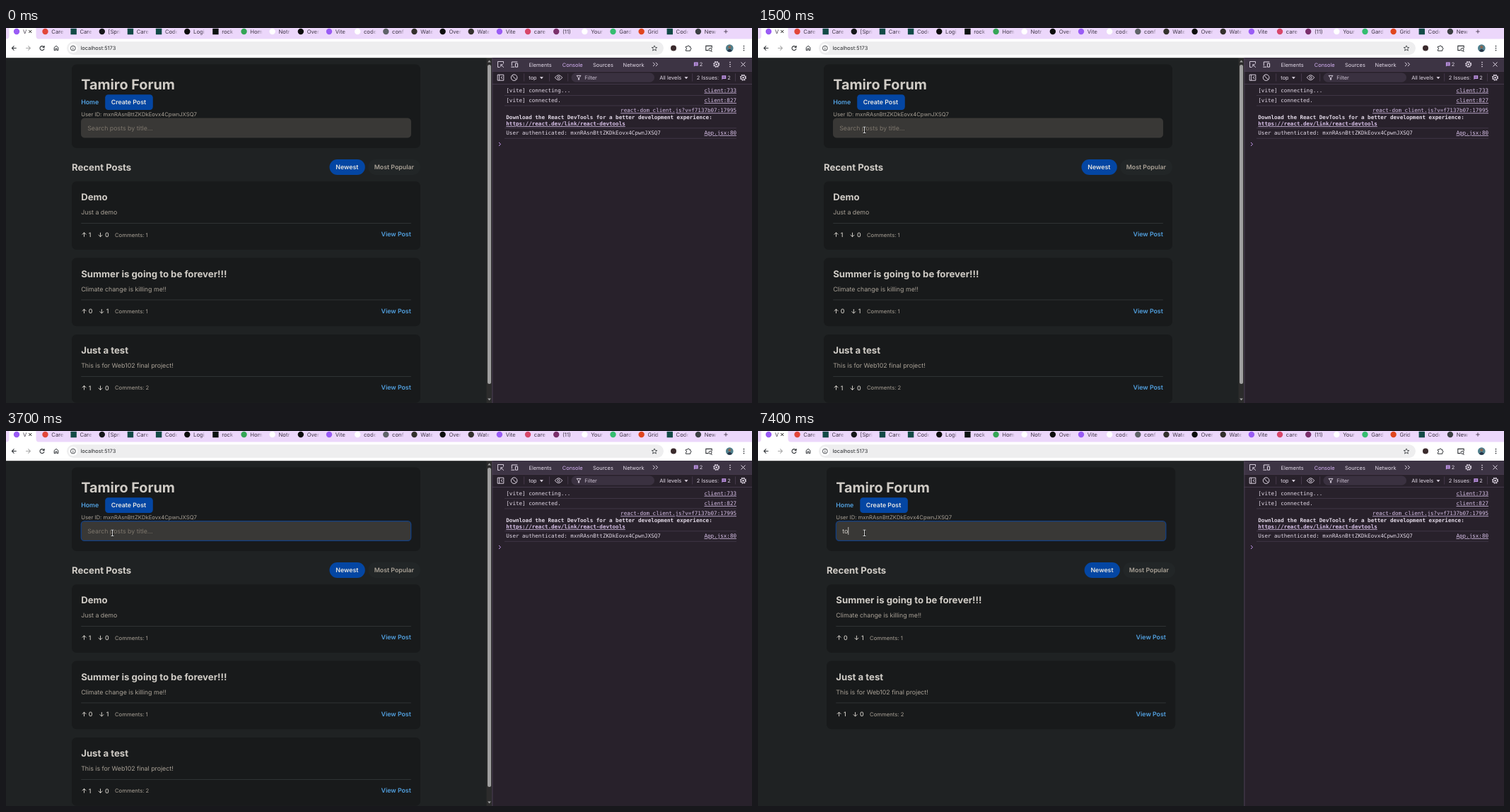
These frames come from a looping animation (1055 by 531 pixels, 8 s). An HTML page:

```html
<!DOCTYPE html>
<html lang="en">
<head>
<meta charset="utf-8">
<title>Forum search</title>
<style>
html, body { margin: 0; width: 100%; height: 100%; overflow: hidden; background: #1f2223; }
svg { display: block; width: 1055px; height: 531px; }
text { font-family: Inter, sans-serif; font-optical-sizing: none; text-rendering: geometricPrecision; white-space: pre; }
.mono { font-family: "DejaVu Sans Mono", monospace; }
</style>
</head>
<body>
<script>
const LOOP = 8000;
const NS = "http://www.w3.org/2000/svg";
const USER_ID = "mxnRAsnBttZKDkEovx4CpwnJXSQ7";
const INK = "#d0ccc6", MUTED = "#aaa297", LINK = "#52a1e0", BLUE = "#0446a3";
const CARD = "#181a1b", STRIP = "#ecd7fb", LILAC = "#d9c2ea", PALE = "#e3dae8";
const PANEL = "#28212b", PANEL_TOP = "#3d3444", PANEL_LINE = "#57495f";

function add(parent, tag, attrs = {}, content) {
  const node = document.createElementNS(NS, tag);
  for (const key in attrs) node.setAttribute(key, attrs[key]);
  if (content !== undefined) node.textContent = content;
  parent.append(node);
  return node;
}
const group = (parent) => add(parent, "g");
const rect = (parent, x, y, width, height, fill, rx = 0, more = {}) =>
  add(parent, "rect", { x, y, width, height, fill, rx, ...more });
const circle = (parent, cx, cy, r, fill, more = {}) =>
  add(parent, "circle", { cx, cy, r, fill, ...more });
const text = (parent, x, y, size, fill, content, weight = 400, more = {}) =>
  add(parent, "text", { x, y, "font-size": size, fill, "font-weight": weight, ...more }, content);
const icon = (parent, x, y, d, stroke, width = 1, fill = "none") =>
  add(parent, "path", { d, stroke, fill, "stroke-width": width, transform: `translate(${x} ${y})` });
const show = (node, on) => node.setAttribute("visibility", on ? "visible" : "hidden");
const shift = (node, x, y) => node.setAttribute("transform", `translate(${x} ${y})`);

const svg = add(document.body, "svg", { viewBox: "0 0 1055 531" });
const defs = add(svg, "defs");
const fade = add(defs, "linearGradient", { id: "fade" });
add(fade, "stop", { offset: 0, "stop-color": STRIP, "stop-opacity": 0 });
add(fade, "stop", { offset: .55, "stop-color": STRIP });

// Forum page
rect(svg, 0, 42, 688, 489, "#1f2223");
const page = group(svg);
rect(page, 93, 51.5, 493, 118.5, CARD, 6.6);
text(page, 106.2, 86.5, 19.8, INK, "Tamiro Forum", 700);
text(page, 106.2, 108.2, 8.8, LINK, "Home", 600);
rect(page, 140.2, 94.2, 67.6, 21.8, BLUE, 4.4);
text(page, 148.7, 108.2, 8.8, "#e8e6e3", "Create Post", 600);
text(page, 106.2, 124.8, 7.7, MUTED, "User ID: " + USER_ID);
rect(page, 106.5, 127.9, 466, 27.2, "#393836", 4.4, { stroke: "#43423f", "stroke-width": .6 });
const ring = rect(page, 106.3, 127.7, 466.4, 27.6, "none", 4.6, { stroke: "#123f82", "stroke-width": 1.3 });
const placeholder = text(page, 115.2, 144.8, 8.8, "#7d766c", "Search posts by title...");
const query = text(page, 115.2, 144.8, 8.8, INK, "");
const caret = rect(page, 0, 136, .8, 11, "#dedbd6");

text(page, 93, 201.6, 13.2, INK, "Recent Posts", 700);
rect(page, 457.5, 186, 50.3, 22, BLUE, 11);
text(page, 466.3, 200.2, 8.8, "#e8e6e3", "Newest", 600);
rect(page, 512.2, 186, 73.8, 22, "#222627", 11);
text(page, 520.7, 200.2, 8.8, MUTED, "Most Popular", 600);

const UP = "M0 3V-3M-2.8 -.2L0 -3L2.8 -.2";
const DOWN = "M0 -3V3M-2.8 .2L0 3L2.8 .2";

function post(parent, y, title, body, up, down, comments) {
  const g = group(parent);
  shift(g, 0, y);
  rect(g, 93, 0, 493, 96.7, CARD, 6.6);
  text(g, 106.2, 27.2, 13.2, INK, title, 700);
  text(g, 106.2, 47, 8.8, MUTED, body);
  rect(g, 106.2, 59, 466.6, .7, "#3a3e40");
  const downX = up ? 133.5 : 135.3;
  icon(g, 110.5, 75.5, UP, INK, 1);
  text(g, 116.8, 78.7, 8.8, INK, up, 500);
  icon(g, downX, 75.5, DOWN, INK, 1);
  text(g, downX + 6.5, 78.7, 8.8, INK, down, 500);
  text(g, 154, 78.4, 7.7, MUTED, "Comments: " + comments);
  text(g, 572.8, 78.3, 8.8, LINK, "View Post", 600, { "text-anchor": "end" });
}
const PITCH = 108.4;
const demo = group(page), matches = group(page);
post(demo, 217.2, "Demo", "Just a demo", 1, 0, 1);
post(matches, 217.2 + PITCH, "Summer is going to be forever!!!", "Climate change is killing me!!", 0, 1, 1);
post(matches, 217.2 + 2 * PITCH, "Just a test", "This is for Web102 final project!", 1, 0, 2);

const scrollbar = group(svg);
rect(scrollbar, 679.5, 42, 8, 489, "#2c2c2c");
rect(scrollbar, 681, 52, 5, 452, "#9f9f9f", 2.5);
icon(scrollbar, 683.5, 47, "M-2.4 1.5L0 -1.5L2.4 1.5Z", "none", 0, "#9f9f9f");
icon(scrollbar, 683.5, 526, "M-2.4 -1.5L0 1.5L2.4 -1.5Z", "none", 0, "#9f9f9f");

// Browser tabs
rect(svg, 0, 0, 1055, 16, STRIP);
const TEAL = "#124a46", BLACK = "#0c0c0c", ROCKET = "#0c1210";
const SQUARE = [TEAL, ROCKET];
const TABS = [
  ["Care", "#e2463a"], ["Care", TEAL], ["[Spri", "#16161a"], ["Care", TEAL], ["Code", TEAL],
  ["Logi", BLACK], ["rock", ROCKET], ["Hom", "#35a556"], ["Notr", "#fff"], ["Over", BLACK],
  ["Vite", "#9a5cf5"], ["code", "#fff"], ["conf", "#5f6368"], ["Wate", "#33302c"], ["Over", BLACK],
  ["Wate", "#33302c"], ["Vite", "#9a5cf5"], ["care", "#d8476a"], ["(11)", "#7a2f6b"], ["Your", "#fff"],
  ["Gard", "#35bd70"], ["Grid", "#e0451f"], ["Code", TEAL], ["New", "#3c4043"],
];
TABS.forEach(([label, color], i) => {
  const x = 55.5 + i * 40.15;
  rect(svg, x - 4.2, .8, 8.4, 8.4, color, SQUARE.includes(color) ? .5 : 4.2);
  text(svg, x + 8.8, 8, 7.7, "#3d3344", label);
  rect(svg, x + 20, 0, 12, 12, "url(#fade)");
});
add(svg, "path", { d: "M1 16Q4.5 15 4.5 11V0H42.5V11Q42.5 15 46 16Z", fill: "#fff" });
circle(svg, 15, 5, 4.2, "#9a5cf5");
text(svg, 24, 8, 7.7, "#3d3344", "V");
icon(svg, 34.3, 5, "M-2 -2L2 2M2 -2L-2 2", "#222", 1);
icon(svg, 1018, 5, "M-2.7 0H2.7M0 -2.7V2.7", "#4a3d52", .9);

// Address bar
rect(svg, 0, 15.5, 1055, 26.7, "#fff");
rect(svg, 86, 19.3, 844, 18.6, "#eeeeef", 9.3);
const DARK = "#33363a";
icon(svg, 11.5, 28.5, "M3.2 0H-3M0 -3.1L-3.1 0L0 3.1", DARK, 1.1);
icon(svg, 31.3, 28.5, "M-3.2 0H3M0 -3.1L3.1 0L0 3.1", "#aaa", 1.1);
icon(svg, 51, 28.5, "M2.5 -1.6A3 3 0 1 0 3 .5M3.1 -3.4V-1H.7", DARK, 1.1);
icon(svg, 71, 28.5, "M-2.8 3.2V-.8L0 -3.2L2.8 -.8V3.2H.9V.5H-.9V3.2Z", DARK, 1);
circle(svg, 94.8, 28.6, 6.5, "#fff");
circle(svg, 94.8, 28.6, 3.4, "none", { stroke: DARK, "stroke-width": .9 });
icon(svg, 94.8, 28.6, "M0 -.3V2M0 -1.9V-1", DARK, .9);
text(svg, 105.5, 31.2, 7.4, "#26282b", "localhost:5173");
icon(svg, 917, 28.6, "M0 -3.7L1.1 -1.2L3.8 -1L1.7 .8L2.4 3.5L0 2L-2.4 3.5L-1.7 .8L-3.8 -1L-1.1 -1.2Z", DARK, .8);
circle(svg, 944, 28.6, 4, "#3a2a2c");
icon(svg, 965, 28.6, "M-3.6 -2.4H-1.2A1.2 1.2 0 0 1 1.2 -2.4H2.8V-.6A1.2 1.2 0 0 1 2.8 1.8V3.7H-3.6V1.8A1.2 1.2 0 0 0 -3.6 -.6Z", DARK, 1);
icon(svg, 994, 28.6, "M-.5 3H-4.2V-3.2H4.2V0M3 3.8L4.6 5", DARK, 1.1);
circle(svg, 996, 30.4, 2, "#fff", { stroke: DARK, "stroke-width": 1 });
circle(svg, 1023.3, 28.6, 5.3, "#4f7f8c");
circle(svg, 1023.3, 27, 2, "#8d6650");
add(svg, "path", { d: "M1019.8 32.6Q1023.3 26.8 1026.8 32.6Q1023.3 35 1019.8 32.6Z", fill: "#273447" });
const dots = (x, y, color) => [-3, 0, 3].forEach(dy => circle(svg, x, y + dy, .85, color));
dots(1043.5, 28.6, DARK);

// Developer tools
rect(svg, 687.5, 42, 367.5, 489, PANEL);
rect(svg, 687.5, 42, 367.5, 19, PANEL_TOP);
rect(svg, 687.5, 42, .8, 489, PANEL_LINE);
rect(svg, 687.5, 61, 367.5, .6, PANEL_LINE);
rect(svg, 687.5, 79.3, 367.5, .6, PANEL_LINE);
icon(svg, 699.5, 51.5, "M4 -1V-4H-4V4H-1M4.4 4.4L.3 .3M.3 3.4V.3H3.4", PALE, .9);
icon(svg, 718.8, 51.5, "M-4.5 3.7H.4M-3.5 2V-3.5H4.5M1.6 -1.3H4.8V3.7H1.6Z", PALE, 1);
[["Elements", 739.5], ["Console", 786.8], ["Sources", 830], ["Network", 872.6]].forEach(([label, x]) =>
  text(svg, x, 54.5, 7.45, label === "Console" ? "#d6b3f5" : PALE, label));
icon(svg, 918.3, 51.5, "M-3.3 -2.7L-.6 0L-3.3 2.7M.6 -2.7L3.3 0L.6 2.7", PALE, 1);

function badge(x, y, background) {
  icon(svg, x, y, "M-2.9 -2.8H2.9V2H-1.7L-2.9 3.3Z", "none", 0, "#c79af0");
  icon(svg, x, y, "M-1.7 -1.2H1.7M-1.7 .4H1.7", background, .6);
  text(svg, x + 5, y + 2.7, 7.4, PALE, "2");
}
function gear(x, y) {
  circle(svg, x, y, 3.8, "none", { stroke: PALE, "stroke-width": 1.5, "stroke-dasharray": "1.7 1.28" });
  circle(svg, x, y, 3.1, "none", { stroke: PALE, "stroke-width": 1 });
  circle(svg, x, y, 1.2, PALE);
}
badge(975.8, 51.4, PANEL_TOP);
gear(1004.7, 51.5);
dots(1024, 51.5, PALE);
icon(svg, 1042.5, 51.5, "M-3 -3L3 3M3 -3L-3 3", PALE, 1);

const downCaret = (x) => icon(svg, x, 70.6, "M-2.5 -1.3H2.5L0 1.6Z", "none", 0, PALE);
[732.5, 768, 794.5, 970.5, 1031].forEach(x => rect(svg, x, 64.5, .6, 11, PANEL_LINE));
icon(svg, 699.5, 70.2, "M-4.3 -4H4.3V4H-4.3ZM-1.8 -4V4M2.6 -1.8L.6 0L2.6 1.8", PALE, .95);
icon(svg, 718.6, 70.2, "M-4.3 0A4.3 4.3 0 1 0 4.3 0A4.3 4.3 0 1 0 -4.3 0M-3 -3L3 3", PALE, 1);
text(svg, 739.3, 72.9, 7.45, PALE, "top");
downCaret(757.4);
icon(svg, 781.5, 70.2, "M-5.2 0Q0 -7 5.2 0Q0 7 -5.2 0Z", PALE, .95);
circle(svg, 781.5, 70.2, 1.6, "none", { stroke: PALE, "stroke-width": .9 });
rect(svg, 799.5, 63.5, 117.5, 13.3, "#3a3140", 6.65);
icon(svg, 810, 70.2, "M-2.9 -2.8H2.9L.6 .3V3H-.6V.3Z", PALE, .9);
text(svg, 818.3, 72.9, 7.45, "#cabfd0", "Filter");
text(svg, 924.2, 72.9, 7.45, PALE, "All levels");
downCaret(962);
text(svg, 976.8, 72.9, 7.45, PALE, "2 Issues:");
badge(1015.3, 70, PANEL);
gear(1042.5, 70.2);

const log = (x, y, fill, content, more = {}) =>
  text(svg, x, y, 7.57, fill, content, 400, { class: "mono", ...more });
const source = (y, content) =>
  log(1033, y, LILAC, content, { "text-anchor": "end", "text-decoration": "underline" });
log(707.3, 90.8, PALE, "[vite] connecting...");
source(90.8, "client:733");
log(707.3, 105.1, PALE, "[vite] connected.");
source(105.1, "client:827");
source(119.4, "react-dom_client.js?v=f7137b07:17995");
log(707.3, 128.7, PALE, "Download the React DevTools for a better development experience:", { "font-weight": 700 });
log(707.3, 138, LILAC, "https://react.dev/link/react-devtools", { "font-weight": 700, "text-decoration": "underline" });
log(707.3, 151.2, PALE, "User authenticated: " + USER_ID);
source(151.2, "App.jsx:80");
[95.4, 109.7, 141.6, 155.9].forEach(y => rect(svg, 705, y, 328, .55, "#51455a"));
icon(svg, 698.3, 164.5, "M-1.3 -2.5L1.3 0L-1.3 2.5", "#c79af0", 1);

// Mouse pointers, hot spot at 0,0
const arrow = icon(svg, 0, 0, "M0 0V8.2L1.9 6.5L3.2 9.5L4.6 8.9L3.3 6H5.8Z", "#fff", .7, "#111");
const beam = group(svg);
for (const [color, width] of [["#111", 2], ["#eee", .9]])
  icon(beam, 0, 0, "M-2 -4.2H2M-2 4.2H2M0 -4.2V4.2", color, width);

const POINTER = [ // ms, x, y
  [700, 46, 1], [800, 61, 32], [900, 77, 67], [1000, 93, 101], [1100, 105, 125],
  [1200, 118, 132], [1300, 133, 139], [1400, 146, 143], [1500, 150.5, 144.3],
];
const CARET = [ // ms, x (0 = blinked off)
  [0, 0], [2100, 115.1], [2700, 0], [3100, 115.1], [3700, 0], [4400, 115.1], [4900, 0],
  [5200, 118.1], [5900, 0], [6300, 118.1], [6900, 0], [7400, 123.3],
];
const RING = [[0, 0], [2200, .85], [2400, 1]];
const QUERY = [[0, ""], [5200, "t"], [7400, "to"]];
const at = (steps, t) => steps.findLast(step => step[0] <= t);

function render(t) {
  const pointer = at(POINTER, t);
  show(arrow, pointer && t < 1200);
  show(beam, t >= 1200);
  if (pointer) shift(t < 1200 ? arrow : beam, pointer[1], pointer[2]);

  const typed = at(QUERY, t)[1], caretX = at(CARET, t)[1];
  query.textContent = typed;
  show(placeholder, !typed);
  show(caret, caretX > 0);
  caret.setAttribute("x", caretX);
  ring.setAttribute("opacity", at(RING, t)[1]);

  const filtered = t >= 5700;
  shift(page, filtered ? 4.1 : 0, 0);
  shift(matches, 0, filtered ? -PITCH : 0);
  show(demo, !filtered);
  show(scrollbar, !filtered);
}

const start = performance.now();
function tick() {
  render((performance.now() - start) % LOOP);
  requestAnimationFrame(tick);
}
render(0);
requestAnimationFrame(tick);
</script>
</body>
</html>
```
